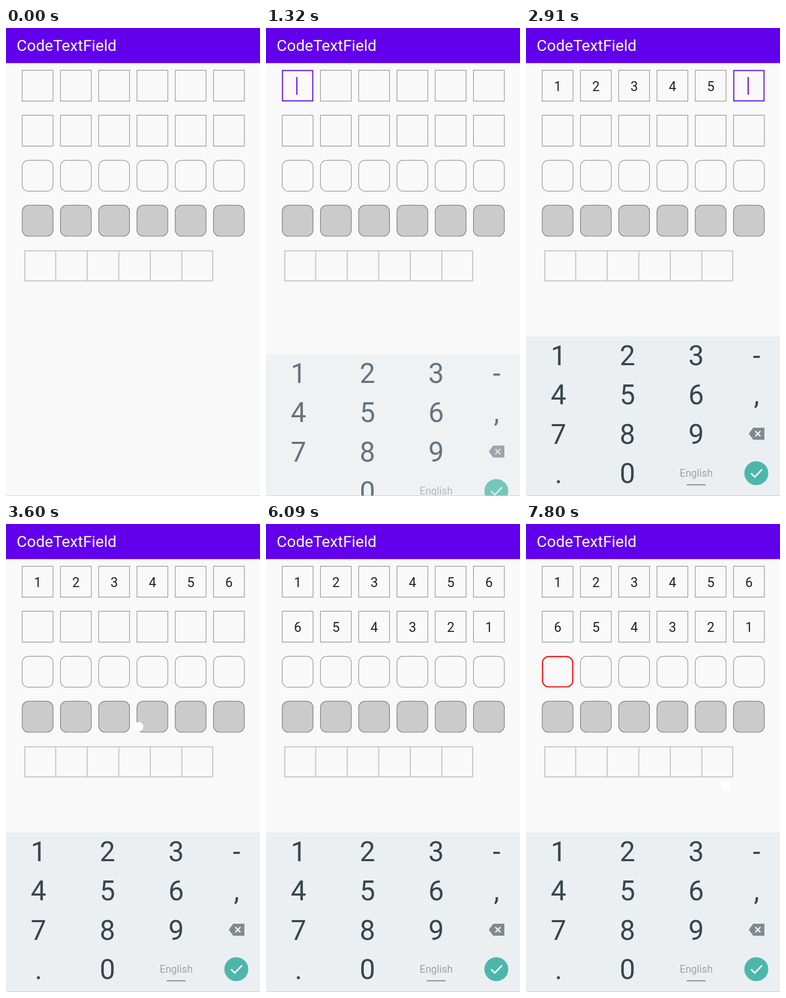
These frames come from a looping animation (488x898 px, 8000 ms). An HTML page with a canvas:

```html
<!DOCTYPE html>
<html lang="en">
<head>
<meta charset="utf-8">
<title>CodeTextField</title>
<style>
  html, body { margin: 0; width: 100%; height: 100%; overflow: hidden; background: #f9f9f9; }
  canvas { display: block; }
</style>
</head>
<body>
<canvas id="stage" width="488" height="898"></canvas>
<script>
const ctx = document.getElementById('stage').getContext('2d');
const LOOP = 8000, PURPLE = '#6200ee', INK = '#37474f';

// Each row gets focus at a time, then one digit at each typed time.
const rows = [
  { y: 81.1, code: '123456', focus: 990, typed: [2070, 2190, 2490, 2700, 2910, 3180], accent: '#6a1fe2', caret: true },
  { y: 167.4, code: '654321', focus: 4350, typed: [4860, 5100, 5340, 5610, 5850, 6090], accent: '#6a1fe2' },
  { y: 253.8, code: '', focus: 7290, typed: [], accent: '#ff0000', radius: 12 },
  { y: 340.2, code: '', focus: Infinity, typed: [], radius: 12, fill: '#cbcbcb' }
];

// Pointer paths: [time, x, y] stops; hidden outside each path.
const paths = [
  [[210, 466, 131], [780, 68, 96], [990, 68, 96]],
  [[3180, 55, 112], [3600, 255, 389], [3750, 290, 371], [4140, 290, 371], [4350, 60.5, 196.5], [4860, 60.5, 196.5]],
  [[6480, 337, 480], [6870, 75, 301], [7020, 75, 301], [7080, 70, 298], [7290, 70, 298],
   [7500, 279, 443], [7650, 279, 443], [7800, 384, 503], [8001, 384, 503]]
];

function text(string, x, y, size, color, align = 'center') {
  ctx.font = `${size}px Roboto, sans-serif`;
  ctx.textAlign = align;
  ctx.fillStyle = color;
  ctx.fillText(string, x, y);
}

function line(points, color, width) {
  ctx.beginPath();
  points.forEach(([x, y]) => ctx.lineTo(x, y));
  ctx.strokeStyle = color;
  ctx.lineWidth = width;
  ctx.stroke();
}

function disc(x, y, r, color) {
  ctx.beginPath();
  ctx.arc(x, y, r, 0, 2 * Math.PI);
  ctx.fillStyle = color;
  ctx.fill();
}

function drawRow(row, t) {
  const count = row.typed.filter(time => t >= time).length;
  const active = t >= row.focus && (count < row.code.length || !row.code) ? count : -1;
  for (let i = 0; i < 6; i++) {
    const x = 31.1 + 73.5 * i, focused = i === active, inset = focused ? 0.6 : 0;
    ctx.beginPath();
    ctx.roundRect(x + inset, row.y + inset, 59.3 - 2 * inset, 59.3 - 2 * inset, row.radius || 0);
    if (row.fill) {
      ctx.fillStyle = row.fill;
      ctx.fill();
    }
    ctx.strokeStyle = focused ? row.accent : row.fill ? '#777' : '#929292';
    ctx.lineWidth = focused ? 2.2 : 1.2;
    ctx.stroke();
    if (i < count) text(row.code[i], x + 29.7, row.y + 39.7, 25.5, '#222');
    if (focused && row.caret) {
      const since = t - (count ? row.typed[count - 1] : row.focus);
      if (since % 990 < 510) line([[x + 28.2, row.y + 13], [x + 28.2, row.y + 47]], PURPLE, 2.2);
    }
  }
}

function drawJoinedRow() {
  ctx.strokeStyle = '#c9c9c9';
  ctx.lineWidth = 2.2;
  ctx.strokeRect(36.1, 427.6, 361, 57.6);
  for (let i = 1; i < 6; i++) line([[35 + 60.55 * i, 427.6], [35 + 60.55 * i, 485.2]], '#c9c9c9', 2.2);
}

function drawKeyboard(t) {
  const p = Math.min(1, (t - 1150) / 350);
  if (p <= 0) return;
  const rest = (1 - p) ** 2;
  ctx.save();
  ctx.globalAlpha = 1 - rest;
  ctx.translate(0, 131 * rest);
  ctx.fillStyle = '#eceff1';
  ctx.fillRect(0, 591.5, 488, 307);
  ['123-', '456,', '789', '.0'].forEach((keys, r) =>
    [...keys].forEach((key, c) => text(key, [62.5, 195, 327, 443][c], 646.5 + 75.6 * r, 53, INK)));

  ctx.beginPath();
  [[428, 778.5], [436.5, 767], [458, 767], [458, 790], [436.5, 790]].forEach(([x, y]) => ctx.lineTo(x, y));
  ctx.fillStyle = '#7f8a90';
  ctx.fill();
  line([[440.5, 773.5], [450.5, 783.5]], '#eceff1', 2.6);
  line([[450.5, 773.5], [440.5, 783.5]], '#eceff1', 2.6);

  text('English', 327, 861, 19.6, '#98a3a8');
  line([[309, 876.5], [345, 876.5]], '#7b8a91', 2);
  disc(442.5, 854.3, 23, '#4db6ac');
  line([[432.5, 854.5], [439.5, 861.5], [453.5, 847]], '#fff', 2.8);
  ctx.restore();
}

function drawPointer(t) {
  const path = paths.find(stops => t >= stops[0][0] && t < stops[stops.length - 1][0]);
  if (!path) return;
  const next = path.findIndex(stop => stop[0] > t);
  const [t0, x0, y0] = path[next - 1], [t1, x1, y1] = path[next];
  const p = (t - t0) / (t1 - t0), ease = p * p * (3 - 2 * p);
  const x = x0 + (x1 - x0) * ease, y = y0 + (y1 - y0) * ease;
  disc(x, y, 9, '#fff');
  disc(x, y, 1.5, '#f3f3f3');
}

function draw(now) {
  const t = now % LOOP;
  ctx.fillStyle = '#f9f9f9';
  ctx.fillRect(0, 0, 488, 898);
  ctx.fillStyle = PURPLE;
  ctx.fillRect(0, 0, 488, 67.4);
  text('CodeTextField', 20.6, 44, 30.2, '#fff', 'left');
  rows.forEach(row => drawRow(row, t));
  drawJoinedRow();
  drawPointer(t);
  drawKeyboard(t);
  line([[0, 897.5], [488, 897.5]], '#cfcfcf', 1);
}

const start = performance.now();
function tick() {
  draw(performance.now() - start);
  requestAnimationFrame(tick);
}
tick();
</script>
</body>
</html>
```
